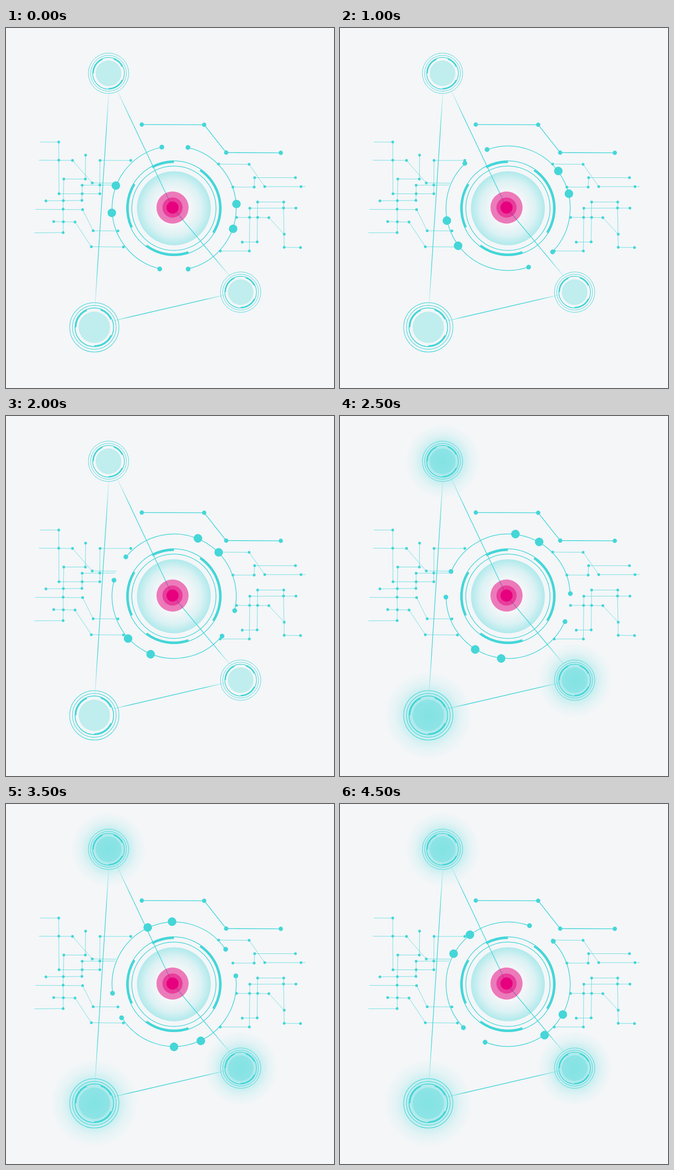
These frames come from a looping animation (715 px wide and 783 px high, 5000 ms). An HTML page:

```html
<!DOCTYPE html>
<html lang="en">
<head>
<meta charset="utf-8">
<title>Connected core</title>
<style>
  html, body { margin: 0; width: 100%; height: 100%; overflow: hidden; background: #f4f6f8; }
  svg { display: block; width: 715px; height: 783px; }
  .line { fill: none; stroke: #45d6d8; }
  .dot { fill: #45d6d8; }
  .bold { stroke-width: 5.5; }
  .circuit { stroke-width: .8; marker: url(#node); }
  .open-start { marker-start: none; }
  .open-end { marker-end: none; }
  .bus { stroke-width: 1.6; marker: url(#bus-node); }
</style>
</head>
<body>
<svg viewBox="0 0 715 783">
  <defs>
    <marker id="node" markerUnits="userSpaceOnUse" overflow="visible"><circle class="dot" r="3"/></marker>
    <marker id="bus-node" markerUnits="userSpaceOnUse" overflow="visible"><circle class="dot" r="4.7"/></marker>
    <radialGradient id="halo">
      <stop offset="0" stop-color="#45d6d8" stop-opacity=".5"/>
      <stop offset=".35" stop-color="#45d6d8" stop-opacity=".41"/>
      <stop offset=".55" stop-color="#45d6d8" stop-opacity=".24"/>
      <stop offset=".75" stop-color="#45d6d8" stop-opacity=".09"/>
      <stop offset="1" stop-color="#45d6d8" stop-opacity="0"/>
    </radialGradient>
    <radialGradient id="bowl">
      <stop offset=".45" stop-color="#45d6d8" stop-opacity="0"/>
      <stop offset=".75" stop-color="#45d6d8" stop-opacity=".14"/>
      <stop offset="1" stop-color="#45d6d8" stop-opacity=".39"/>
    </radialGradient>
    <g id="satellite">
      <circle class="dot" r="28" opacity=".3"/>
      <g class="line">
        <circle r="44"/>
        <circle r="39"/>
        <circle r="34.5" stroke-width="1.5"/>
      </g>
      <g id="satellite-arcs"></g>
    </g>
  </defs>

  <g id="halos" fill="url(#halo)">
    <circle cx="223.5" cy="98.5" r="81"/>
    <circle cx="511.5" cy="574.5" r="81"/>
    <circle cx="192.5" cy="651" r="95"/>
  </g>

  <g class="line">
    <polyline class="bus" points="296,210 432,210.5 480,271 599,271.5"/>
    <g id="left-circuit">
      <polyline class="circuit open-start" points="74,248 115,248 115,287.5 115.5,360.5 204.5,360.5 204.5,341.5 205,288 272,288"/>
      <polyline class="circuit open-start open-end" points="72,287.5 145,288 188,337 240,337.5"/>
      <polyline class="circuit open-end" points="173.5,276.5 173,328.5 126,328.5 125,375.5 124.5,394 125,421.5 124.5,445 62,445.5"/>
      <polyline class="circuit open-end" points="87,376 165.5,375 166,360.5 166,342 238,341.5"/>
      <polyline class="circuit open-start" points="64,394.5 167,395 190,441 244,441.3"/>
      <polyline class="circuit" points="104,421 150.5,422 186,475.7 256,476.3"/>
    </g>
    <g id="right-circuit">
      <polyline class="circuit open-end" points="463.5,296 530,296.5 564,345 643,345 653,345"/>
      <polyline class="circuit" points="494.5,346 541,346 542,325.5 631,325.5"/>
      <polyline class="circuit" points="502.5,412 531,412 548.5,412 573,412.5 606.5,448.5"/>
      <polyline class="circuit" points="515,465.8 547.5,465.3 548.5,378.5 605.5,378.5 605,391.5 606.5,477 642,477.5"/>
      <polyline class="circuit" points="467,485 530.5,485 531.5,392 632,391.7"/>
    </g>
  </g>

  <g transform="translate(366 392)">
    <circle r="80.5" fill="url(#bowl)"/>
    <g class="line" stroke-width="1.5">
      <circle r="91.8"/>
      <circle r="103"/>
    </g>
    <g id="core-arcs"></g>
  </g>

  <g id="beams"></g>

  <g transform="translate(366.5 392)"><g id="orbit"></g></g>

  <g fill="#e6007e" transform="translate(363 390.5)">
    <circle r="35" opacity=".5"/>
    <circle r="22" opacity=".5"/>
    <circle r="13.2"/>
  </g>

  <use href="#satellite" transform="translate(223.5 98.5)"/>
  <use href="#satellite" transform="translate(511.5 574.5)"/>
  <use href="#satellite" transform="translate(192.5 651) scale(1.22)"/>
</svg>
<script>
  const byId = id => document.getElementById(id);
  const point = (radius, degrees) => {
    const a = degrees * Math.PI / 180;
    return [radius * Math.cos(a), radius * Math.sin(a)];
  };
  const arc = (radius, from, to, width) =>
    `<path class="line" stroke-width="${width}" d="M${point(radius, from)}A${radius} ${radius} 0 0 1 ${point(radius, to)}"/>`;
  const dot = (radius, degrees, size) => {
    const [x, y] = point(radius, degrees);
    return `<circle class="dot" cx="${x}" cy="${y}" r="${size}"/>`;
  };

  byId('core-arcs').innerHTML = [[-118, -90], [-55.4, 31.8], [71.7, 126.5], [155.5, 211.3]]
    .map(([from, to]) => arc(101.2, from, to, 5.5)).join('');
  byId('satellite-arcs').innerHTML = [[180, 246], [-70, -25.5], [25.5, 90]]
    .map(([from, to]) => arc(33.5, from, to, 3)).join('');
  byId('orbit').innerHTML =
    arc(135.3, -77.2, 77, 1.5) + arc(135.3, 103.4, 258.6, 1.5) +
    [-77.2, 77, 103.4, 258.6].map(a => dot(135.7, a, 5.2)).join('') +
    [-3.9, 19.2, 175.8, 201.2].map(a => dot(136.2, a, 9.3)).join('');

  // Beams fade out towards the satellites.
  const beam = (x1, y1, x2, y2, fadeIn, fadeOut, i) => {
    const ends = `x1="${x1}" y1="${y1}" x2="${x2}" y2="${y2}"`;
    const stop = (offset, opacity) =>
      `<stop offset="${offset}" stop-color="#45d6d8" stop-opacity="${opacity}"/>`;
    return `<linearGradient id="beam${i}" gradientUnits="userSpaceOnUse" ${ends}>
      ${stop(0, fadeIn ? 0 : 1)}${stop(fadeIn, 1)}${stop(1 - fadeOut, 1)}${stop(1, fadeOut ? 0 : 1)}
      </linearGradient><line ${ends} stroke="url(#beam${i})" stroke-width="1.5"/>`;
  };
  byId('beams').innerHTML = [
    [224.7, 130, 193.5, 614, .2, .2],
    [239, 129, 363, 390.5, .25, 0],
    [363, 390.5, 493, 546, 0, .3],
    [222, 639.5, 484, 579, .2, .2]
  ].map((b, i) => beam(...b, i)).join('');

  const STEP = 500;
  const turns = [0, 16.3, 32.6, 48, 63.7, 79.4, 95.5, 111.1, 129, 146.9];

  function draw() {
    const step = Math.floor(performance.now() / STEP) % turns.length;
    byId('orbit').setAttribute('transform', `rotate(${-turns[step]})`);
    byId('halos').setAttribute('opacity', step % 2);
    requestAnimationFrame(draw);
  }
  draw();
</script>
</body>
</html>
```
